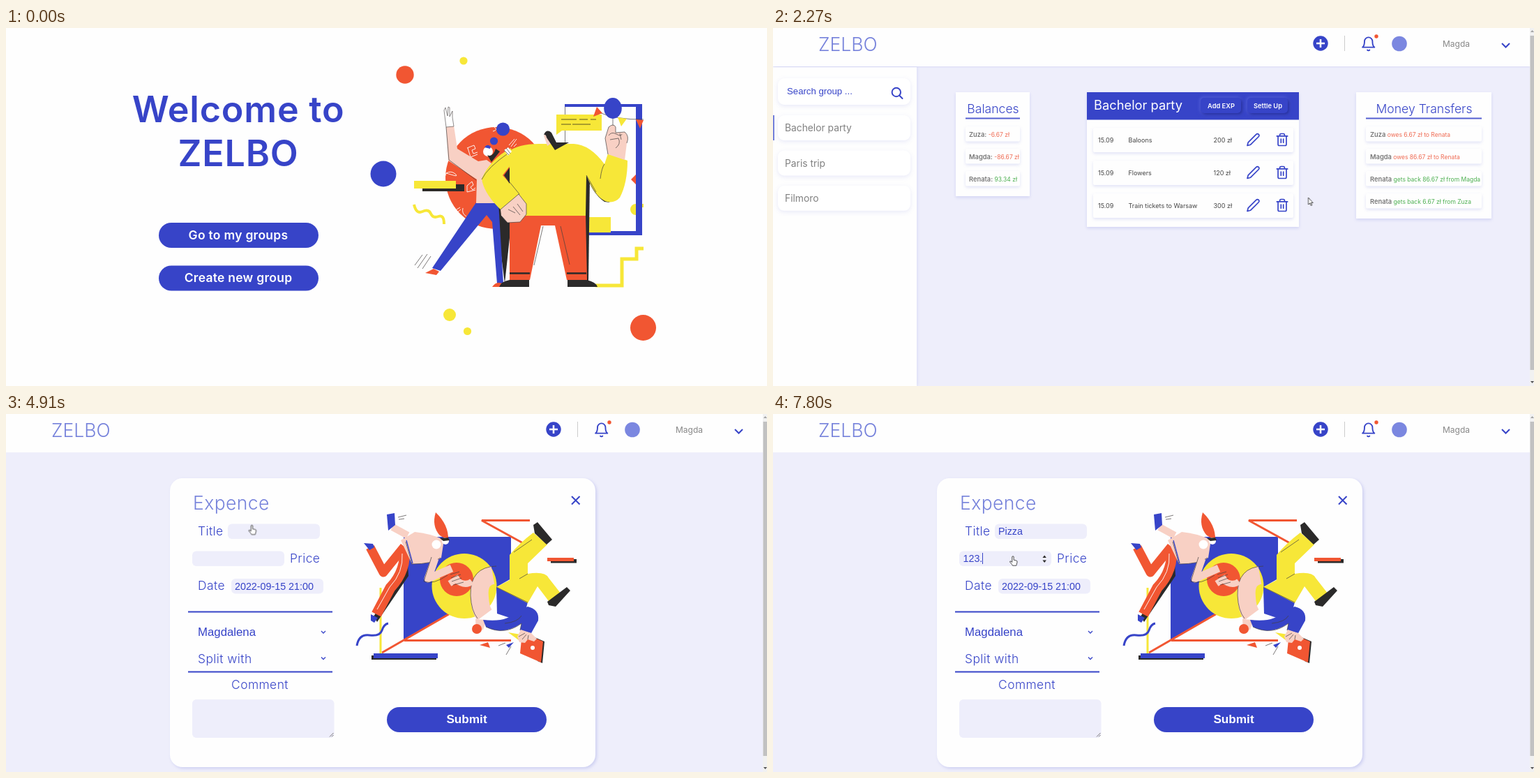
Animation, 1091 px wide and 513 px high, one loop 8 s. Source, as an HTML page:

```html
<!DOCTYPE html>
<html lang="en">
<head>
<meta charset="utf-8">
<title>Shared expenses demo</title>
<style>
:root { --blue: #3744c8; --soft: #7682db; --pale: #eeeefb; --red: #f15632; --yellow: #f7e738; --pink: #f8d0c4; --ink: #2b2a2a; }
html, body { margin: 0; width: 100%; height: 100%; overflow: hidden; background: #fefefe; }
svg { position: absolute; left: 0; top: 0; width: 1091px; height: 513px; }
text { font-family: Inter, sans-serif; }
.blue { fill: var(--blue); } .soft { fill: var(--soft); } .pale { fill: var(--pale); }
.red { fill: var(--red); } .yellow { fill: var(--yellow); } .pink { fill: var(--pink); }
.ink { fill: var(--ink); } .white { fill: #fff; }
.line { fill: none; stroke: var(--blue); stroke-width: 2; }
.fine { stroke-width: 1.3; } .thick { stroke-width: 3; }
.thin { fill: none; stroke: #443f3f; stroke-width: .7; }
.chalk { fill: none; stroke: #fff; stroke-width: .9; }
.icon { fill: none; stroke: var(--blue); stroke-width: 2; stroke-linecap: round; stroke-linejoin: round; }
.mid { text-anchor: middle; }
.big { font-size: 52px; font-weight: 600; letter-spacing: .015em; }
.cta { font-size: 17.5px; font-weight: 600; letter-spacing: .015em; fill: #fff; }
.brand { font-size: 26.5px; font-weight: 300; fill: var(--soft); }
.card { fill: #fefefe; filter: drop-shadow(0 2px 2px #3744c826); }
.side { fill: #fff; filter: drop-shadow(0 2px 3px #3744c81c); }
.group { font-size: 13.8px; fill: #808080; }
.head { font-size: 17.6px; font-weight: 350; }
.row { font-size: 9px; fill: #444; }
.note { font-size: 8.5px; }
.note tspan { font-size: 9.3px; font-weight: 600; fill: #777; }
.owe { fill: #ef6a52; } .get { fill: #4caf50; }
.press { fill: var(--blue); filter: drop-shadow(2px 2px 2px #232d9a) drop-shadow(-1px -1px 2px #5561dc); }
.act { font: 600 9.3px Inter, sans-serif; fill: #fff; }
.label { font-size: 17.4px; font-weight: 350; letter-spacing: .025em; fill: var(--blue); }
.arial { font-family: "Liberation Sans", Arial, sans-serif; fill: var(--blue); }

#home, #dash, #form, .bar, #art, #status, .type, #cursor, #arrow, #hand, #spin { animation: 8s infinite step-end; }
#home { animation-name: home; } .bar { animation-name: bar; } #dash { animation-name: dash; }
#form { animation-name: form; } #art { animation-name: art; } #spin { animation-name: spin; }
#status { animation-name: status; animation-timing-function: linear; }
@keyframes home { 0% { visibility: visible; } 12.5%, 100% { visibility: hidden; } }
@keyframes bar { 0% { visibility: hidden; } 12.5%, 100% { visibility: visible; } }
@keyframes dash { 0% { visibility: hidden; } 12.5% { visibility: visible; } 46.625%, 100% { visibility: hidden; } }
@keyframes form { 0% { visibility: hidden; } 46.625%, 100% { visibility: visible; } }
@keyframes art { 0% { opacity: 0; } 48.875%, 100% { opacity: 1; } }
@keyframes spin { 0% { opacity: 0; } 79.5%, 100% { opacity: 1; } }
@keyframes status { 0%, 9.5% { opacity: 0; } 13%, 15.8% { opacity: 1; } 18.625%, 100% { opacity: 0; } }

/* typed fields: the right border is the caret */
.type { position: absolute; height: 16px; overflow: hidden; white-space: nowrap; color: var(--blue);
  font: 14.3px/16px "Liberation Sans", Arial, sans-serif; border-right: 1px solid transparent; }
#name { left: 323px; top: 160px; animation-name: name; }
#price { left: 272.5px; top: 199px; animation-name: price; }
@keyframes name {
  0% { width: 0; border-color: transparent; }
  54.75% { width: 0; border-color: var(--blue); }
  61.375% { width: 0; border-color: transparent; }
  65.375% { width: .667em; border-color: var(--blue); }
  68% { width: .889em; border-color: var(--blue); }
  69.5% { width: 1.389em; border-color: var(--blue); }
  72.5% { width: 1.889em; border-color: var(--blue); }
  75.75% { width: 2.46em; border-color: var(--blue); }
  80.4%, 100% { width: 2.46em; border-color: transparent; }
}
@keyframes price {
  0% { width: 0; border-color: transparent; }
  80.4% { width: 0; border-color: var(--blue); }
  83.2% { width: .556em; border-color: var(--blue); }
  85.75% { width: 1.112em; border-color: var(--blue); }
  91.375% { width: 1.668em; border-color: var(--blue); }
  97.5%, 100% { width: 1.946em; border-color: var(--blue); }
}

#cursor { animation-name: move; animation-timing-function: linear; }
@keyframes move {
  0% { transform: translate(955px, 520px); }
  1.25% { transform: translate(954px, 512px); animation-timing-function: cubic-bezier(.35, .1, .4, 1); }
  7.875%, 22.5% { transform: translate(351px, 295px); }
  23.5% { transform: translate(361px, 298px); animation-timing-function: cubic-bezier(.4, .1, .5, 1); }
  28.375% { transform: translate(767.5px, 243px); animation-timing-function: cubic-bezier(.4, 0, .5, 1); }
  32.375% { transform: translate(662px, 130px); animation-timing-function: ease-out; }
  37.125%, 48.875% { transform: translate(642.5px, 115.5px); animation-timing-function: cubic-bezier(.4, .1, .4, 1); }
  54.75% { transform: translate(346px, 164px); }
  57.125%, 75.75% { transform: translate(352.5px, 159.5px); animation-timing-function: ease-in-out; }
  78.6% { transform: translate(358px, 234px); animation-timing-function: ease-in-out; }
  80.3%, 100% { transform: translate(344px, 204px); }
}
#arrow { animation-name: arrow; } #hand { animation-name: hand; }
@keyframes arrow {
  0% { opacity: 1; } 6% { opacity: 0; } 16.25% { opacity: 1; } 33.2% { opacity: 0; }
  49.4% { opacity: 1; } 53.5%, 100% { opacity: 0; }
}
@keyframes hand {
  0% { opacity: 0; } 6% { opacity: 1; } 16.25% { opacity: 0; } 33.2% { opacity: 1; }
  49.4% { opacity: 0; } 53.5%, 100% { opacity: 1; }
}
</style>
</head>
<body>
<svg viewBox="0 0 1091 513">
<defs>
  <path id="pencil" class="icon" transform="translate(678.3 149.8) scale(.85)" d="M17 3a2.83 2.83 0 1 1 4 4L7.5 20.5 2 22l1.5-5.5z"/>
  <path id="bin" class="icon" transform="translate(719.8 149.8) scale(.85)" d="M3 6h18M19 6v14a2 2 0 0 1-2 2H7a2 2 0 0 1-2-2V6M8 6V4a2 2 0 0 1 2-2h4a2 2 0 0 1 2 2v2M10 11v6M14 11v6"/>
  <g id="expense"><rect class="card" x="459" y="143" width="287" height="35" rx="2"/><use href="#pencil"/><use href="#bin"/></g>
  <rect id="owed" class="card" x="850" y="141" width="166" height="21.5" rx="2"/>
  <rect id="saldo" class="card" x="276" y="141" width="78" height="21.5" rx="2"/>
  <rect id="tab" class="side" x="7" y="125" width="190" height="36" rx="9"/>
  <rect id="pill" class="blue" width="229" height="36" rx="18"/>
</defs>

<g id="home">
  <rect width="1091" height="513" fill="#fefefe"/>
  <text class="big mid blue" x="333" y="135">Welcome to</text>
  <text class="big mid blue" x="333" y="198">ZELBO</text>
  <use href="#pill" x="219" y="279"/><use href="#pill" x="219" y="340.5"/>
  <text class="cta mid" x="333" y="303">Go to my groups</text>
  <text class="cta mid" x="333" y="364">Create new group</text>

  <circle class="red" cx="572" cy="67" r="12.7"/><circle class="yellow" cx="656" cy="47" r="5.6"/>
  <circle class="blue" cx="541" cy="209" r="18.5"/><circle class="red" cx="913.5" cy="429.5" r="18.5"/>
  <circle class="yellow" cx="636" cy="411" r="9"/><circle class="yellow" cx="661.5" cy="434.5" r="5.6"/>

  <!-- backdrop -->
  <circle class="red" cx="703" cy="215" r="73"/>
  <path class="chalk" d="M661 172l10-4 2 5 -5 2 2 5 6-2M662 172l4 13 10-4M698 148q8-2 2-6M721 168l8-9M724 170l8-11M728 170l4-4M631 208q7-4 13 1t-6 1-7 1M661 226l7-6 2 5-4 3 3 4 4-3M661 226v9l12 -3M643 262l8-5M646 265l6-5M655 258q-2 8 5 12"/>
  <path class="blue" d="M801 109h111v188h-78v-6h69V113H801z"/>
  <path class="thin" d="M801.5 113v53"/>
  <path class="yellow" d="M789 124h65v23h-57l-8 6z"/>
  <path d="M796 131h22m4 0h12m4 0h8M796 138h14m2 0h26" stroke="#5c5722" fill="none"/>
  <path class="thin" d="M845 119q30 13 69 12"/>
  <path class="red" d="M847 113l8 9-13 5zM903 131l11 1-5 12zM896 217l7-7v14z"/>
  <path class="yellow" d="M877 128l13 2-8 11zM835 271h32v22h-32zM903 252a8 8 0 0 0 0 16zM912 252h2v5h-2z"/>
  <path class="ink" d="M597 224h60v10h-60z"/><path class="yellow" d="M585 219h60v11h-60z"/>
  <path d="M585 253q3 14 12 10t12 3 11 4 8 11" fill="none" stroke="var(--yellow)" stroke-width="4"/>
  <path d="M845 369h38v-38h21v-15h10" fill="none" stroke="var(--yellow)" stroke-width="5"/>
  <path class="thin" d="M586 340l11-15M590 344l14-20M597 345l12-18"/>

  <!-- small dancer -->
  <path class="ink" d="M704 251h18v50l-7 65-12-95z"/>
  <path class="blue" d="M674 250h32l7 116h-9l-7-88-8-10-66 80-12-4z"/>
  <path class="red" d="M601 351l12-6 8 4-4 5zM697 371q4-6 9-6l6 1v5z"/>
  <path class="pink" d="M631 142l11-2 5 33 30 18 12-2 14 10v52h-29l1-34-41-27z"/>
  <path d="M631 142l-3-24 2-4 3 12 1-13 2 1v13l4-8v9l2 13z" fill="#fff" stroke="#443f3f" stroke-width=".6"/>
  <path class="thin" d="M631 142l4 47 39 29"/>
  <circle class="white" cx="691" cy="177" r="7"/><path class="blue" d="M686 171q4-6 9-1l-1 3z"/>
  <path class="ink" d="M690 182q8 4 12-9l6 4-12 15z"/>
  <circle class="blue" cx="712.5" cy="145" r="9.6"/><circle class="blue" cx="699.5" cy="162" r="5.6"/>

  <!-- big figure -->
  <path class="ink" d="M830 205l7 12-2 145h-14z"/>
  <path class="red" d="M722 267h109l2 94h-29l-17-78h-20l-16 78h-29z"/>
  <path class="thin" d="M770 284l-13 56M795 284l13 55"/>
  <path d="M722 351.5h29M804 351.5h28" stroke="var(--ink)" stroke-width="2.5"/>
  <path class="ink" d="M707 371q3-8 15-10h28v10zM805 361h27q14 3 16 10h-43z"/>
  <path class="ink" d="M831 207l10 12q10 25 25 31l-8-1q-18-12-27-42z"/>
  <path class="yellow" d="M719 178q16-13 50-12h45q23 1 44 29l5-15 28 10q0 32-11 53-7 8-18 6-16-4-30-38l-1 58H722V203z"/>
  <path class="yellow" d="M724 172q-30 16-42 44 3 22 30 47l24-25-24-27 14-18z"/>
  <path class="ink" d="M714 211l8-11v23z"/>
  <path class="thin" d="M722 178q-32 22-40 39M714 211l22 27-24 25M832 211l14 24M852 216q2-16 6-21"/>
  <path class="pink" d="M709 260l26-22 11 14v15l-9 11-18 1-9-10z"/>
  <path class="thin" d="M709 260l26-22 11 14v15l-9 11-18 1-9-10M720 260l10 5M733 252l8 11M727 256l10 12"/>
  <path class="pink" d="M771 154q6-8 9 0l2 11-6 4z"/>
  <path class="ink" d="M771 153q4-9 11-3l7 14h18l-20 11-12-18q-1-5-4-4z"/>
  <path class="white" d="M714 175l6-4 5 6-5 6z"/>
  <path class="thin" d="M714 175l7 7M717 172l6 8"/>
  <path class="thin" d="M870 128v32"/><ellipse class="blue" cx="870" cy="115" rx="12.8" ry="15"/>
  <path class="pink" d="M863 181l-4-23 5-16q7-6 10 0v8l13-1q7 6 3 16l-3 24z"/>
  <path class="thin" d="M863 181l-4-23 5-16q7-6 10 0v8l13-1q7 6 3 16M864 154q4-6 11-2t8 0M866 160l12-2q4 8-4 14M880 151l2 9"/>
</g>

<rect class="bar pale" width="1091" height="513"/>

<g id="dash">
  <rect y="56" width="206" height="457" fill="#fefefe" style="filter:drop-shadow(1px 0 2px #3744c81c)"/>
  <rect width="1085" height="55" fill="#fefefe" style="filter:drop-shadow(0 1px 1px #3744c81c)"/>
  <rect class="side" x="7" y="72" width="190" height="38" rx="9"/>
  <text class="arial" x="20" y="95" font-size="13.2">Search group ...</text>
  <path class="icon" d="M183 92a6.2 6.2 0 1 1-12.4 0 6.2 6.2 0 1 1 12.4 0M181.5 97l4 4"/>
  <use href="#tab"/><use href="#tab" y="50.4"/><use href="#tab" y="100.8"/>
  <rect class="soft" y="125" width="2" height="36"/>
  <text class="group" x="17" y="148">Bachelor party</text>
  <text class="group" x="17" y="198.5">Paris trip</text>
  <text class="group" x="17" y="249">Filmoro</text>

  <rect class="card" x="262" y="92" width="106" height="149"/>
  <text class="head mid blue" x="315.5" y="122">Balances</text>
  <use href="#saldo"/><use href="#saldo" y="32"/><use href="#saldo" y="64"/>
  <text class="note owe" x="281" y="155.5"><tspan>Zuza:</tspan> -6.67 zł</text>
  <text class="note owe" x="281" y="187.5"><tspan>Magda:</tspan> -86.67 zł</text>
  <text class="note get" x="281" y="219.5"><tspan>Renata:</tspan> 93.34 zł</text>

  <rect class="card" x="450" y="92" width="304" height="193"/>
  <rect class="blue" x="450" y="92" width="304" height="39.5"/>
  <text class="white" x="460" y="117" font-size="18.3">Bachelor party</text>
  <rect class="press" x="613" y="100" width="58" height="22" rx="5"/>
  <rect class="press" x="680" y="100" width="58" height="22" rx="5"/>
  <text class="act mid" x="642.5" y="114.5">Add EXP</text>
  <text class="act mid" x="709.5" y="114.5">Settle Up</text>
  <use href="#expense"/><use href="#expense" y="47"/><use href="#expense" y="94"/>
  <g class="row">
    <text x="466" y="163.5">15.09</text><text x="509.5" y="163.5">Baloons</text><text x="631.5" y="163.5">200 zł</text>
    <text x="466" y="210.5">15.09</text><text x="509.5" y="210.5">Flowers</text><text x="631.5" y="210.5">120 zł</text>
    <text x="466" y="257.5">15.09</text><text x="509.5" y="257.5">Train tickets to Warsaw</text><text x="631.5" y="257.5">300 zł</text>
  </g>

  <rect class="card" x="836" y="92" width="194" height="181"/>
  <text class="head mid blue" x="933.5" y="122">Money Transfers</text>
  <path class="line" stroke-opacity=".85" d="M276 129.5h78M850 129.5h166"/>
  <use href="#owed"/><use href="#owed" y="32"/><use href="#owed" y="64"/><use href="#owed" y="96"/>
  <text class="note owe" x="856" y="155.5"><tspan>Zuza</tspan> owes 6.67 zł to Renata</text>
  <text class="note owe" x="856" y="187.5"><tspan>Magda</tspan> owes 86.67 zł to Renata</text>
  <text class="note get" x="856" y="219.5"><tspan>Renata</tspan> gets back 86.67 zł from Magda</text>
  <text class="note get" x="856" y="251.5"><tspan>Renata</tspan> gets back 6.67 zł from Zuza</text>
</g>

<g id="form">
  <rect x="235" y="92" width="610" height="414" rx="18" fill="#fefefe" style="filter:drop-shadow(2px 2px 2px #3744c82e)"/>
  <text class="brand" x="268" y="137" letter-spacing=".4">Expence</text>
  <rect class="pale" x="318" y="157.5" width="132" height="21.5" rx="6"/>
  <rect class="pale" x="267" y="196.5" width="132" height="21.5" rx="6"/>
  <rect class="pale" x="323" y="236" width="132" height="21.5" rx="6"/>
  <text class="label" x="275" y="174">Title</text>
  <text class="label" x="407" y="213">Price</text>
  <text class="label" x="275" y="252">Date</text>
  <text class="arial" x="328" y="251.5" font-size="14.3">2022-09-15 21:00</text>
  <path id="spin" class="ink" d="M386.500 206l2.700-3.500 2.700 3.500zM386.500 209.500l2.700 3.500 2.700-3.500z"/>
  <path class="line" d="M261 283.500h207M261 369.500h207"/>
  <text class="arial" x="275" y="318" font-size="16.8">Magdalena</text>
  <text class="label" x="275" y="357">Split with</text>
  <path class="line fine" d="M452 311l3 3 3-3M452 348.500l3 3 3-3"/>
  <text class="label mid" x="364" y="394" font-size="18">Comment</text>
  <rect class="pale" x="267" y="409" width="203.500" height="55" rx="6"/>
  <path class="thin" d="M464 462.500l5.500-5.500M467 462.500l2.500-2.500"/>
  <use href="#pill" x="546" y="420"/>
  <text class="arial mid" x="660.5" y="443" font-size="17.2" font-weight="700" style="fill:#fff">Submit</text>

  <g id="art">
    <path class="line" d="M811 118l11.500 11.500M822.500 118L811 129.500"/>
    <path class="blue" d="M570 176h154v60L570 324z"/>
    <path d="M751 152.500h-69l80 44M539 342l146-84M571 324.500h153" fill="none" stroke="var(--red)" stroke-width="3"/>
    <path d="M537 249v95" stroke="var(--yellow)" stroke-width="3"/>
    <path class="ink" d="M524 346h93v6h-93z"/><path class="blue" d="M527 343h92v7h-92z"/>
    <path class="line thick" d="M503 332q3-17 18-15t18-7 9-10"/>
    <path class="ink" d="M781 208h37v5.500h-37z"/><path class="red" d="M776 206h38v5h-38z"/>
    <path class="red" d="M679 331l12-4 3 8z"/>
    <path class="thin" d="M562 148l12-3M563 151l8-1M706 332l10-4M717 345l7-12"/>
    <path class="blue" d="M717 331l11-4-7 8z"/>
    <circle class="yellow" cx="657" cy="246.5" r="46.5"/>
    <circle class="red" cx="646" cy="237" r="24"/>

    <!-- left figure -->
    <path class="ink" d="M576 214l1 18-45 66-5-8z"/>
    <g fill="none" stroke="var(--red)" stroke-linejoin="round">
      <path d="M522 191l19 36 30-37" stroke-width="13"/>
      <path d="M571 190q4 34-20 59l-20 38" stroke-width="15"/>
    </g>
    <path class="chalk" d="M568 200q2 27-18 48l-18 32"/>
    <path class="blue" d="M513 185l13 1 2 5-7 4zM523 287l10 5-5 7-5-3z"/>
    <path d="M554 162l22 12" stroke="var(--pink)" stroke-width="10"/>
    <path class="blue" d="M546 144l11-2 1 17-10 8z"/>
    <path class="pink" d="M566 181l20-12q21 2 42 11l-4 26q-13 9-42 9z"/>
    <path class="thin" d="M573 183l9 32q29 0 41-9"/><path class="line fine" d="M574 181l9 33"/>
    <path d="M615 207l-10 29 34-15" fill="none" stroke="var(--pink)" stroke-width="11" stroke-linejoin="round"/>
    <path class="thin" d="M610 205l-11 35q14 5 34-9"/>
    <path class="red" d="M616 141q-6 20 6 33l12 7q1-22-18-40z"/>
    <circle class="white" cx="617" cy="187" r="6.5"/><circle class="white" cx="630" cy="182" r="5"/>
    <path class="ink" d="M622 178l12-1 2 4-9 1z"/>

    <!-- right figure -->
    <path class="blue" d="M703 248l45 22-4 14-22 8-18-6z"/>
    <path d="M698 231q-22 4-19 32 1 17 7 25" fill="none" stroke="var(--pink)" stroke-width="26"/>
    <path class="thin" d="M703 218q-38 1-37 42 1 22 10 33"/>
    <path d="M668 240q-10 8-24-3M636 243l14-9" fill="none" stroke="var(--pink)" stroke-width="9"/>
    <path class="thin" d="M637 230l13-4M638 235l14-5M639 240l14-5M641 245l15-4"/>
    <path class="pink" d="M673 294l16 1-5 14-10 3z"/><circle class="red" cx="675" cy="308" r="7"/>
    <path class="blue" d="M684 295q36 4 46-12l18-7q17 4 15 20l-10 18-16-4 2-10q-27 18-51 5z"/>
    <path class="thin" d="M688 305q27 13 51-5l-2 10M715 300q19-2 24-11"/>
    <path class="yellow" d="M703 248l19-10v-36q14-17 34-32l20 17-28 27v15q25-4 30 6l18 23-15 14-19-25-14 24z"/>
    <path class="thin" d="M728 198l26-18M748 229l-12 7M748 270l-45-22"/>
    <path class="ink" d="M756 159l6-4 21 25-8 7-17-16zM776 269l28-21 5 5-21 23-10-2z"/>
    <path class="yellow" d="M720 313l18 3-3 8z"/>
    <path class="ink" d="M744 314l28 12-3 31-7-3z"/><path class="red" d="M740 313l30 13-3 30-30-13z"/>
    <circle class="white" cx="755" cy="335" r="3"/>
    <path class="pink" d="M738 309l15 5 8 8-4 4-9-3-4 5-8-1-3-8z"/>
    <path class="thin" d="M735 319l9-5M740 323l6-7M748 323l1-6"/>
  </g>
</g>

<g class="bar">
  <rect width="1085" height="55" fill="#fefefe"/>
  <text class="brand" x="65" y="32.5">ZELBO</text>
  <circle class="blue" cx="785" cy="22" r="10.7"/><path d="M779 22h12M785 16v12" stroke="#fff" stroke-width="2.5"/>
  <path d="M819.5 11v22" stroke="#ccc"/>
  <path class="icon" transform="translate(842.3 11.5) scale(.95)" d="M18 8A6 6 0 0 0 6 8c0 7-3 9-3 9h18s-3-2-3-9M13.7 21a2 2 0 0 1-3.4 0"/>
  <circle class="red" cx="865" cy="12" r="2.7"/>
  <circle cx="898" cy="22.5" r="10.8" fill="#7b87e0"/>
  <text x="960" y="27" font-size="12" fill="#888">Magda</text>
  <path class="line" d="M1045 22l5.500 5.500 5.500-5.500"/>
  <rect x="1085" width="6" height="513" fill="#f1f1f1"/><rect x="1085.5" y="11" width="5.5" height="479" fill="#c1c1c1"/>
  <path d="M1086 6l2.500-3 2.500 3z" fill="#a3a3a3"/><path d="M1086 506l2.500 3 2.500-3z" fill="#505050"/>
</g>
</svg>

<div class="type" id="name">Pizza</div>
<div class="type" id="price">123.</div>

<svg viewBox="0 0 1091 513">
  <g id="status">
    <rect y="499" width="252.5" height="14" fill="#dee1e6"/>
    <text x="0" y="509.5" font-size="8.4" fill="#3c4043" style="font-family:'Open Sans',sans-serif">127.0.0.1:8000/group/3569223e-c5f4-48a7-b5b1-3203114917b4/</text>
  </g>
  <g id="cursor" fill="#fff" stroke="#222" stroke-width=".8" stroke-linejoin="round">
    <path id="arrow" d="M0 0v10l2.300-2 1.500 3.500 1.500-.7-1.500-3.300H6.700z"/>
    <path id="hand" d="M-1.200 1a1.200 1.200 0 0 1 2.400 0v4.200l3.600.8q1.500.4 1.300 2l-.7 3.200-.6 2H-.5l-1-1.700-2.800-3.400q-.4-1.500 1.200-1.200l1.900 1.500z"/>
  </g>
</svg>
</body>
</html>
```
